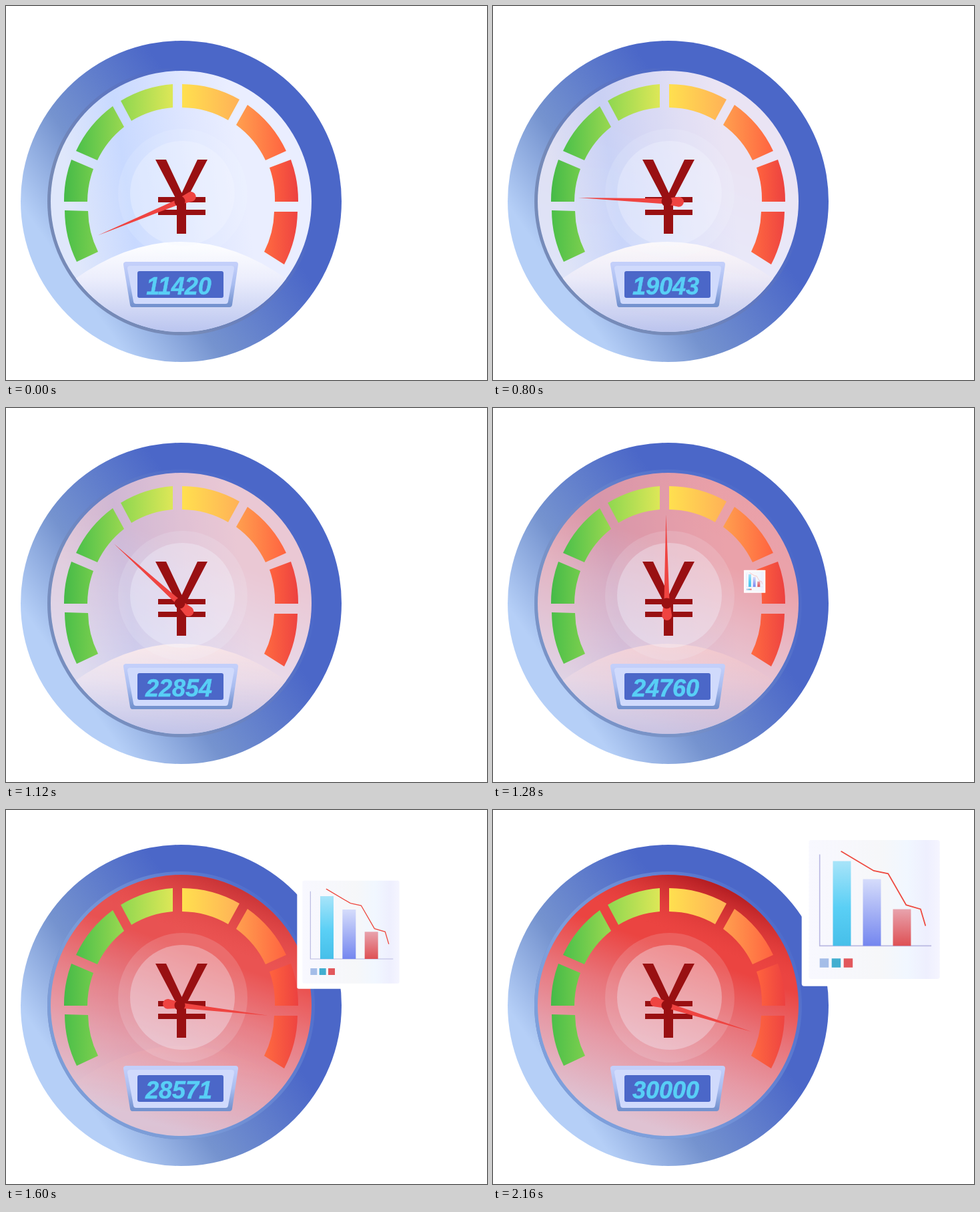
Recreate the animation shown at these times as an HTML page. Size 721 by 560 pixels, loop 3 s.

```html
<!DOCTYPE html>
<html lang="en">
<head>
<meta charset="utf-8">
<title>Money gauge</title>
<style>
  html, body { margin: 0; width: 100%; height: 100%; overflow: hidden; background: #fff; }
  svg { display: block; }
  #count { font: italic bold 36px "Liberation Sans", Arial, sans-serif; }
</style>
</head>
<body>
<svg width="721" height="560" viewBox="0 0 721 560">
  <defs>
    <linearGradient id="ring" gradientUnits="userSpaceOnUse" x1="66" y1="430" x2="338" y2="240">
      <stop offset=".12" stop-color="#b5cff7"/><stop offset=".47" stop-color="#7593cf"/><stop offset="1" stop-color="#4b67c8"/>
    </linearGradient>
    <linearGradient id="rim" gradientUnits="userSpaceOnUse" x1="90" y1="400" x2="340" y2="200">
      <stop offset=".3" stop-color="#768ab7"/><stop offset="1" stop-color="#4b67c8"/>
    </linearGradient>
    <linearGradient id="hotRim" gradientUnits="userSpaceOnUse" x1="90" y1="400" x2="440" y2="200">
      <stop offset=".3" stop-color="#7d9fdc"/><stop offset="1" stop-color="#4f6ccb"/>
    </linearGradient>
    <linearGradient id="face" x2="1" y2="-.15">
      <stop offset="0" stop-color="#dfe7fb"/><stop offset=".22" stop-color="#c8d9ff"/>
      <stop offset=".5" stop-color="#e0e7ff"/><stop offset=".66" stop-color="#eaeeff"/>
    </linearGradient>
    <linearGradient id="hill" x2="0" y2="1">
      <stop offset="0" stop-color="#fff"/><stop offset=".4" stop-color="#eceefc"/><stop offset="1" stop-color="#b9c4ef"/>
    </linearGradient>
    <linearGradient id="hot" gradientUnits="userSpaceOnUse" x1="330" y1="100" x2="195" y2="480">
      <stop offset=".3" stop-color="#eb4441"/><stop offset=".5" stop-color="#e8747a"/>
      <stop offset=".7" stop-color="#e69aa6"/><stop offset=".95" stop-color="#dfc2d2"/>
    </linearGradient>
    <linearGradient id="shade" gradientUnits="userSpaceOnUse" x1="345" y1="100" x2="306" y2="198">
      <stop offset="0" stop-color="#a3121a"/><stop offset="1" stop-color="#e03a38" stop-opacity="0"/>
    </linearGradient>
    <linearGradient id="frame" x2="0" y2="1">
      <stop offset="0" stop-color="#c3cffa"/><stop offset=".5" stop-color="#a9bdf0"/><stop offset="1" stop-color="#7593cf"/>
    </linearGradient>
    <linearGradient id="card">
      <stop offset="0" stop-color="#f8f8ff"/><stop offset=".55" stop-color="#f6f7f9"/>
      <stop offset=".75" stop-color="#f1f7ff"/><stop offset=".9" stop-color="#eeeffe"/><stop offset="1" stop-color="#f5f5ff"/>
    </linearGradient>
    <linearGradient id="cyan" x2="0" y2="1">
      <stop offset="0" stop-color="#a8e4f9"/><stop offset=".55" stop-color="#5acff5"/><stop offset="1" stop-color="#46bfe9"/>
    </linearGradient>
    <linearGradient id="violet" x2="0" y2="1"><stop stop-color="#d5dcfb"/><stop offset="1" stop-color="#7486ef"/></linearGradient>
    <linearGradient id="rose" x2="0" y2="1"><stop stop-color="#e8a3ad"/><stop offset="1" stop-color="#de5054"/></linearGradient>
    <clipPath id="dial"><circle cx="262.5" cy="292.5" r="195.5"/></clipPath>
  </defs>

  <circle cx="262.5" cy="292.5" r="240.5" fill="url(#ring)"/>
  <circle cx="262.5" cy="292.5" r="200.5" fill="url(#rim)"/>
  <circle cx="262.5" cy="292.5" r="195.5" fill="url(#face)"/>
  <path d="M100 411Q262 295 424 411V490H100Z" fill="url(#hill)" clip-path="url(#dial)"/>
  <g id="heat">
    <circle cx="262.5" cy="292.5" r="200.5" fill="url(#hotRim)"/>
    <circle cx="262.5" cy="292.5" r="195.5" fill="url(#hot)"/>
  </g>
  <circle id="dark" cx="262.5" cy="292.5" r="195.5" fill="url(#shade)"/>
  <g fill="#f2f6ff">
    <circle cx="265" cy="281" r="97" opacity=".15"/>
    <circle cx="264.5" cy="280.5" r="78.5" opacity=".33"/>
  </g>
  <g id="bands"></g>

  <g stroke-linejoin="round" stroke-width="8">
    <path d="M180 387H344L335 447H190Z" fill="url(#frame)" stroke="url(#frame)"/>
    <path d="M186 393H338L329 442H195Z" fill="#d0dafc" stroke="#d0dafc"/>
  </g>
  <rect x="197" y="397" width="129" height="40" rx="3" fill="#4b67c8"/>
  <text id="count" x="259" y="432" text-anchor="middle" fill="#58cff6" stroke="#58cff6" stroke-width=".5"></text>

  <path fill="#991012" d="M224 230h16l23.500 50L287 230h15L270 291V341H256V291ZM228 286h71v8h-71ZM228 305h71v8h-71Z"/>
  <g id="needle">
    <path fill="#ef4441" d="M-133 0L-4-4L18-7.500A7.500 7.500 0 0 1 18 7.500L-4 4Z"/>
    <circle r="8" fill="#991012"/>
  </g>

  <g id="chart">
    <rect x="474" y="7" width="242" height="255" rx="4" fill="#fff"/>
    <rect x="486" y="19" width="218" height="231" rx="4" fill="url(#card)"/>
    <path d="M504 43V195H690" fill="none" stroke="#bab9e2" stroke-width="1.800"/>
    <rect x="526" y="54" width="30" height="141" fill="url(#cyan)"/>
    <rect x="576" y="84" width="30" height="111" fill="url(#violet)"/>
    <rect x="626" y="134" width="30" height="61" fill="url(#rose)"/>
    <path d="M540 38L594 70L618 75L648 127L672 134L680 161" fill="none" stroke="#ee4a40" stroke-width="2" stroke-linecap="round"/>
    <rect x="504" y="216" width="15" height="15" fill="#a4bde8"/>
    <rect x="524" y="216" width="15" height="15" fill="#42aed0"/>
    <rect x="544" y="216" width="15" height="15" fill="#e2585c"/>
  </g>
</svg>
<script>
const $ = id => document.getElementById(id);

// Each band: two outer corners, two inner corners, left and right colour.
const bands = [
  ['106 383', '88 306', '123 307', '138 368', '#4bbf49', '#7ccf4e'],
  ['87 293', '98 230', '131 244', '122 293', '#45ba48', '#72cc4c'],
  ['105 217', '160 150', '177 181', '137 231', '#4bc04a', '#9ad850'],
  ['172 142', '250 117', '250 152', '188 172', '#8ed750', '#dde757'],
  ['264 117', '350 140', '333 171', '264 152', '#ffe04f', '#ffb157'],
  ['362 148', '420 217', '389 231', '345 178', '#ffa04f', '#ff6340'],
  ['427 230', '438 293', '403 293', '395 242', '#ff633e', '#ec4140'],
  ['437 308', '417 387', '387 368', '402 308', '#ff6a40', '#ee4441']
];
$('bands').innerHTML = bands.map(([a, b, c, d, from, to], i) =>
  `<linearGradient id="b${i}"><stop stop-color="${from}"/><stop offset="1" stop-color="${to}"/></linearGradient>
  <path fill="url(#b${i})" d="M${a}A175.500 175.500 0 0 1 ${b}L${c}A140.500 140.500 0 0 0 ${d}Z"/>`).join('');

// Keys are [step, value, slope]; cubic Hermite between them.
const turn = [[3, -22.9, .4], [4, -22.5, .45], [10, -18.2, 1.1], [20, 2.4, 3.2], [28, 42.1, 8.5], [36, 145.9, 13], [43, 197.3, 0]];
const heat = [[16, 0, 0], [20, .05, .016], [28, .22, .04], [36, .7, .055], [44, 1, 0]];

function curve(keys, k) {
  const last = keys[keys.length - 1];
  if (k <= keys[0][0]) return keys[0][1];
  if (k >= last[0]) return last[1];
  const i = keys.findIndex(key => key[0] > k);
  const [k0, v0, m0] = keys[i - 1], [k1, v1, m1] = keys[i];
  const h = k1 - k0, u = (k - k0) / h, w = 1 - u;
  return v0 * w * w * (1 + 2 * u) + v1 * u * u * (3 - 2 * u) + h * u * w * (m0 * w - m1 * u);
}

function chartScale(k) {
  if (k <= 45) return Math.max(0, (k - 30) / 15);
  return 1 - .1 * Math.min(1, (k - 45) / 9);
}

function draw(ms) {
  const step = Math.floor(ms % 3000 / 40);
  const k = step < 3 ? 4 : step; // opening pose is held
  $('count').textContent = Math.min(30000, Math.round(14278.4 + 476.42 * (k - 10)));
  $('needle').setAttribute('transform', `translate(260.5 292.5) rotate(${curve(turn, k)})`);
  const glow = curve(heat, k);
  $('heat').setAttribute('opacity', glow);
  $('dark').setAttribute('opacity', glow ** 5); // the shadow arrives late
  const s = chartScale(k);
  $('chart').setAttribute('transform', `translate(361 279) scale(${s}) translate(-361 -279)`);
  $('chart').style.display = s ? '' : 'none';
}

const start = performance.now();
(function tick() {
  draw(performance.now() - start);
  requestAnimationFrame(tick);
})();
</script>
</body>
</html>
```
